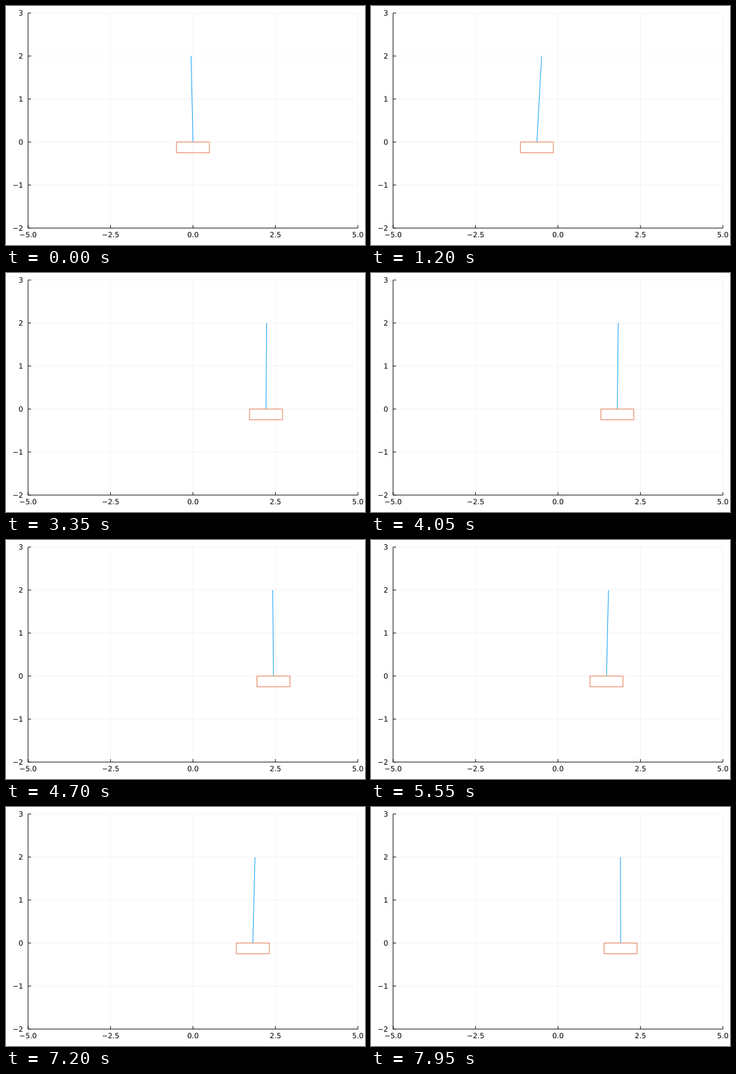
An HTML page for the animation above (8000 ms loop, 600 by 400 pixels).

```html
<!DOCTYPE html>
<html lang="en">
<head>
<meta charset="utf-8">
<title>Cart and pole</title>
<style>
  html, body { margin: 0; width: 100%; height: 100%; overflow: hidden; background: #fff; }
  svg { display: block; width: 600px; height: 400px; }
  text { font: 12px "DejaVu Sans", sans-serif; text-rendering: geometricPrecision; }
  path, rect { fill: none; stroke-width: 1; }
  #grid { stroke: #000; stroke-opacity: .1; stroke-width: .5; }
  #axes { stroke: #000; }
  #pole { stroke: #009afa; }
  #cart { stroke: #e26f46; }
</style>
</head>
<body>
<svg viewBox="0 0 600 400">
  <path id="grid"/>
  <path id="axes"/>
  <g id="labels"></g>
  <path id="pole"/>
  <rect id="cart" y="227.7" width="55.1" height="18"/>
</svg>
<script>
const LOOP = 8000, STEP = 50;
const LEFT = 36.9, RIGHT = 588.1, TOP = 11.8, BOTTOM = 371.7;
const UNIT_X = (RIGHT - LEFT) / 10, UNIT_Y = (BOTTOM - TOP) / 5;
const LEAN_GAIN = 0.108, LEAN_SPAN = 300;
const toX = x => LEFT + (x + 5) * UNIT_X;
const toY = y => BOTTOM - (y + 2) * UNIT_Y;
const byId = id => document.getElementById(id);

// Where the cart reverses: [ms, px]
const turns = [
  [0, 312.5], [900, 193.5], [1740, 489.5], [2050, 475.2], [2400, 504.5],
  [3860, 408.5], [4950, 452.5], [5750, 383.5], [6535, 451.5], [7180, 412.5],
  [7620, 433.8], [7895, 415.6], [8000, 418.5], [8400, 390]
];

// The cart swings from turn to turn along half cosine waves
function cartAt(time) {
  const next = turns.findIndex(([t]) => t > time);
  if (next < 1) return turns[0][1];
  const [t0, x0] = turns[next - 1], [t1, x1] = turns[next];
  const u = (time - t0) / (t1 - t0);
  return x0 + (x1 - x0) * (1 - Math.cos(Math.PI * u)) / 2;
}

// The pole leans the way the cart accelerates
const leanAt = time => LEAN_GAIN *
  (cartAt(time - LEAN_SPAN) + cartAt(time + LEAN_SPAN) - 2 * cartAt(time));

function label(x, y, anchor, value) {
  const text = document.createElementNS("http://www.w3.org/2000/svg", "text");
  text.setAttribute("x", x);
  text.setAttribute("y", y);
  text.setAttribute("text-anchor", anchor);
  text.textContent = value.replace("-", "\u2212");
  byId("labels").append(text);
}

function drawPlot() {
  let grid = "", axes = `M${LEFT} ${TOP}V${BOTTOM}H${RIGHT}`;
  for (let x = -5; x <= 5; x += 2.5) {
    grid += `M${toX(x)} ${TOP}V${BOTTOM}`;
    axes += `M${toX(x)} ${BOTTOM}v-5`;
    label(toX(x), 387, "middle", x.toFixed(1));
  }
  for (let y = -2; y <= 3; y++) {
    grid += `M${LEFT} ${toY(y)}H${RIGHT}`;
    axes += `M${LEFT} ${toY(y)}h5`;
    label(28.7, toY(y) + 4.4, "end", String(y));
  }
  byId("grid").setAttribute("d", grid);
  byId("axes").setAttribute("d", axes);
}

function draw(now) {
  const time = Math.floor(now % LOOP / STEP) * STEP;
  const x = cartAt(time), lean = leanAt(time);
  const height = 2 * Math.sqrt(1 - (lean / UNIT_X / 2) ** 2);
  byId("cart").setAttribute("x", x - UNIT_X / 2);
  byId("pole").setAttribute("d", `M${x} ${toY(0)}L${x + lean} ${toY(height)}`);
}

let start;
function tick(now) {
  start ??= now;
  draw(now - start);
  requestAnimationFrame(tick);
}

drawPlot();
draw(0);
requestAnimationFrame(tick);
</script>
</body>
</html>
```
